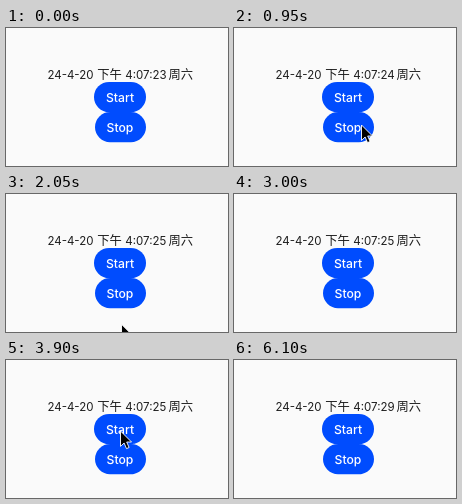
Recreate the animation shown at these times as an HTML page. Size 222 by 138 pixels, loop 6150 ms.

```html
<!DOCTYPE html>
<html lang="zh">
<head>
<meta charset="utf-8">
<title>Clock</title>
<style>
html, body { margin: 0; width: 100%; height: 100%; overflow: hidden; background: #fafafa; }
svg { display: block; width: 100%; height: 100%; }
text { font-family: Inter, "Noto Sans CJK SC", "Noto Sans CJK", sans-serif; font-size: 11.5px; fill: #1c1c1c; }
.han { font-size: 12.3px; }
.label { font-size: 12.2px; font-weight: 500; fill: #fff; text-anchor: middle; }
.button { fill: #004cfe; }
</style>
</head>
<body>
<svg viewBox="0 0 222 138">
  <rect width="222" height="138" fill="#fafafa"/>
  <text y="50.7">
    <tspan x="41.4">24-4-20</tspan>
    <tspan x="91.2" class="han">下午</tspan>
    <tspan x="119.3" id="time">4:07:23</tspan>
    <tspan x="162.4" class="han">周六</tspan>
  </text>
  <rect class="button" x="88" y="53.9" width="52" height="30.2" rx="15.1"/>
  <text class="label" x="114" y="73.6">Start</text>
  <rect class="button" x="89" y="84" width="51" height="30.2" rx="15.1"/>
  <text class="label" x="114" y="103.8">Stop</text>
  <path id="cursor" d="M0 0V15.4L3.6 12 6 17.6 8.6 16.5 6.2 11H11Z" fill="#000" stroke="#fff" stroke-width=".9" stroke-linejoin="round"/>
</svg>
<script>
const LOOP = 6150, STOPPED = 1400, RESUMED = 4400;
const time = document.getElementById('time');
const cursor = document.getElementById('cursor');

const easeOut = k => 1 - (1 - k) ** 3;
const progress = (t, from, to) => easeOut(Math.min(1, Math.max(0, (t - from) / (to - from))));

// Each visit enters at a point, then glides from stop to stop
const visits = [
  { from: 50, to: 2450, x: 174, y: 138, moves: [
    { from: 50, to: 650, x: 168, y: 112 },
    { from: 650, to: 950, x: 127.5, y: 97 },
    { from: 950, to: 1350, x: 115.5, y: 98.7 },
    { from: 1950, to: 2165, x: 115.5, y: 136 }
  ] },
  { from: 3400, to: 4550, x: 116, y: 138, moves: [
    { from: 3350, to: 3770, x: 114.5, y: 71 },
    { from: 4250, to: 4550, x: 116, y: 138 }
  ] }
];

function pointerAt(t) {
  const visit = visits.find(v => t >= v.from && t < v.to);
  if (!visit) return null;
  let { x, y } = visit;
  for (const m of visit.moves) {
    const k = progress(t, m.from, m.to);
    x += (m.x - x) * k;
    y += (m.y - y) * k;
  }
  return { x, y };
}

// The clock ticks each second but is frozen between Stop and Start
function seconds(t) {
  const shown = t >= STOPPED && t < RESUMED ? STOPPED : t;
  return 24 + Math.floor((shown - 400) / 1000);
}

function draw(ms) {
  const t = Math.floor(ms % LOOP / 50) * 50;
  const p = pointerAt(t);
  time.textContent = '4:07:' + seconds(t);
  cursor.setAttribute('visibility', p ? 'visible' : 'hidden');
  if (p) cursor.setAttribute('transform', `translate(${p.x} ${p.y})`);
}

const start = performance.now();
function loop() {
  draw(performance.now() - start);
  requestAnimationFrame(loop);
}
loop();
</script>
</body>
</html>
```
